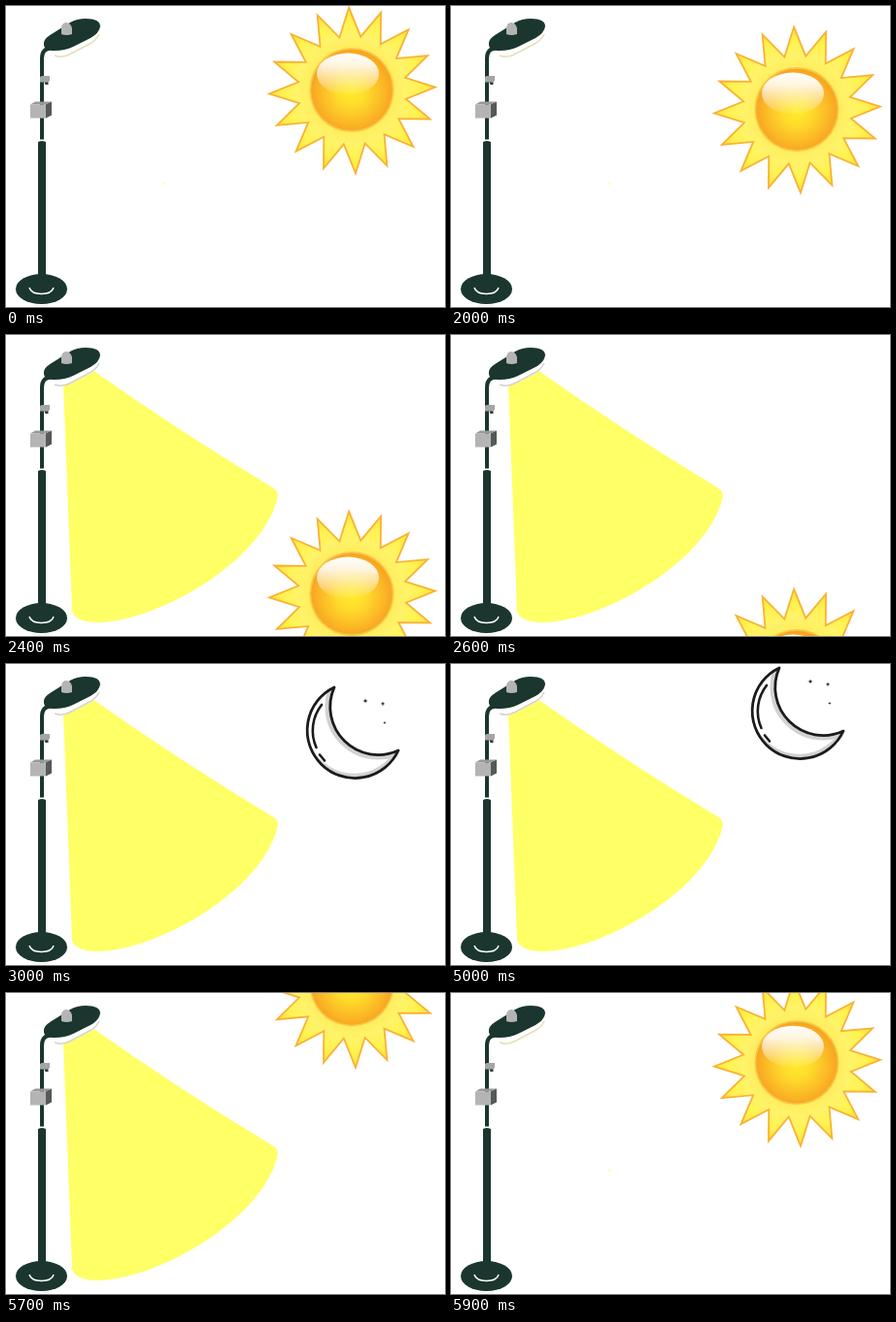
An HTML page for the animation above (6000 ms loop, 452 by 310 pixels).

```html
<!DOCTYPE html>
<html lang="en">
<head>
<meta charset="utf-8">
<title>Street lamp, day and night</title>
<style>
  html, body { margin: 0; width: 100%; height: 100%; overflow: hidden; background: #fff; }
  svg { display: block; width: 100%; height: 100%; }
</style>
</head>
<body>
<svg viewBox="0 0 452 310">
  <defs>
    <radialGradient id="rayFill" gradientUnits="userSpaceOnUse" cx="356" cy="86.500" r="86">
      <stop offset=".5" stop-color="#ffed5c"/>
      <stop offset=".64" stop-color="#fff36a"/>
      <stop offset=".8" stop-color="#fff352"/>
      <stop offset="1" stop-color="#ffe23a"/>
    </radialGradient>
    <radialGradient id="bodyFill" cx=".5" cy=".52" r=".52">
      <stop offset="0" stop-color="#ffec2c"/>
      <stop offset=".35" stop-color="#fedb2b"/>
      <stop offset=".75" stop-color="#fbb826"/>
      <stop offset="1" stop-color="#f7a21f"/>
    </radialGradient>
    <linearGradient id="gloss" x2="0" y2="1">
      <stop offset="0" stop-color="#fff"/>
      <stop offset=".3" stop-color="#fff" stop-opacity=".85"/>
      <stop offset="1" stop-color="#fff" stop-opacity=".04"/>
    </linearGradient>
    <path id="crescent" d="M338 24A49.200 49.200 0 1 0 404 89A49.500 49.500 0 0 1 338 24Z"/>
    <clipPath id="inMoon"><use href="#crescent"/></clipPath>
  </defs>

  <g id="beam">
    <path fill="#ffff66" d="M59 50L68 284Q71 296 95 296C160 294 264 232 279.500 168Q281 161 275 157.500Q175 97 89 36Z"/>
  </g>
  <circle id="spot" cx="163" cy="182.500" r="1.200" fill="#ffffb4"/>

  <g id="lamp">
    <path fill="#fff" d="M44 46L50 51Q58 54 66 50L88 39Q95 35 96 27Z"/>
    <path id="rim" fill="none" stroke-width="1.500" d="M50 51Q58 54 66 49.500L87 38.500Q93 35 96 29"/>
    <path fill="none" stroke="#1a362e" stroke-width="4" d="M46 43.500Q37 44 37 54V137.500"/>
    <path fill="#1a362e" d="M39 38Q39 34 46 29.500L66 17Q73 13 82 13Q97 13 97 21Q96 28 87 33L69 42Q61 46 50 46Q38 46 39 38Z"/>
    <path fill="#b4b4b4" d="M57 29V22Q58 17 62.500 17Q67 18 68 23V29Q62 31 57 29Z"/>
    <path fill="#333b39" d="M39 77H43.500V81H40.500Z"/>
    <path fill="#a5a5a5" d="M35 73L37 72H45V77L43 78.500H35Z"/>
    <path fill="#55595a" d="M41 101L47 98.500V112.500L41 115.500Z"/>
    <path fill="#999" d="M25 101.500L30 98.500H47L41 101.500Z"/>
    <path fill="#b4b4b4" d="M25 101.500H41V115.500H25Z"/>
    <path fill="#1a362e" d="M33 140Q37 138 41 140V280H33Z"/>
    <ellipse cx="36.500" cy="291.500" rx="26.500" ry="15.500" fill="#1a362e"/>
    <path fill="none" stroke="#fff" stroke-width="1.500" d="M24 290Q26 296.500 36.500 296.500T49 290"/>
    <path fill="none" stroke="#eee" d="M28 308.500Q36 309.500 44 308.500"/>
  </g>

  <g id="sun">
    <path id="rays" fill="url(#rayFill)" stroke="#f9b233" stroke-width="1.800"/>
    <circle cx="356" cy="86.500" r="43.500" fill="#f6bb42" opacity=".75"/>
    <circle cx="356" cy="86.500" r="41.800" fill="url(#bodyFill)"/>
    <ellipse cx="352" cy="70" rx="32" ry="21.500" fill="url(#gloss)"/>
  </g>

  <g id="moon">
    <g clip-path="url(#inMoon)">
      <rect x="300" y="15" width="115" height="110" fill="#d2d2d2"/>
      <circle cx="358.500" cy="63.500" r="49.200" fill="#fff"/>
      <circle cx="383" cy="44" r="49.500" fill="none" stroke="#d2d2d2" stroke-width="10"/>
    </g>
    <use href="#crescent" fill="none" stroke="#1b1b1b" stroke-width="2.800" stroke-linejoin="round"/>
    <g fill="none" stroke="#1b1b1b" stroke-width="2.600" stroke-linecap="round">
      <path d="M325 42A43 43 0 0 0 319.500 86"/>
      <path d="M323 93.500L328 99.500"/>
    </g>
    <path id="stars" fill="#1b1b1b"/>
  </g>
</svg>
<script>
const LOOP = 6000, STEP = 100;
const el = id => document.getElementById(id);
const [sun, moon, beam, spot, rim] = ['sun', 'moon', 'beam', 'spot', 'rim'].map(el);

function rayPath() {
  let d = '';
  for (let i = 0; i < 32; i++) {
    const a = (-92.3 + i * 11.25) * Math.PI / 180;
    const r = i % 2 ? 56 : 85.5;
    d += (i ? 'L' : 'M') + (356.5 + r * Math.cos(a)).toFixed(2) + ' ' + (87 + r * Math.sin(a)).toFixed(2);
  }
  return d + 'Z';
}

function starPath(x, y, r) {
  return `M${x} ${y - r}Q${x} ${y} ${x + r} ${y}Q${x} ${y} ${x} ${y + r}` +
    `Q${x} ${y} ${x - r} ${y}Q${x} ${y} ${x} ${y - r}Z` +
    `M${x - r / 2} ${y}L${x} ${y - r / 2}L${x + r / 2} ${y}L${x} ${y + r / 2}Z`;
}

el('rays').setAttribute('d', rayPath());
el('stars').setAttribute('d', starPath(370, 38, 3) + starPath(388, 41, 2.4) + starPath(390, 60.5, 1.8));

// Drop in from above, n steps after becoming visible
const enter = n => Math.min(0, -136 + 40.4 * n);

function place(node, y) {
  node.style.display = y === null ? 'none' : '';
  if (y !== null) node.setAttribute('transform', `translate(0 ${y})`);
}

function sunY(k) {
  if (k < 20) return 0;
  if (k < 28) return 20 + 40 * (k - 20);
  return k < 56 ? null : enter(k - 56);
}

function moonY(k) {
  if (k < 27 || k > 54) return null;
  return k < 50 ? enter(k - 26) : -20 * (k - 49);
}

function draw(t) {
  const k = Math.floor((t % LOOP) / STEP);
  const lit = k >= 23 && k < 58;
  place(sun, sunY(k));
  place(moon, moonY(k));
  beam.style.display = lit ? '' : 'none';
  spot.style.display = lit ? 'none' : '';
  rim.setAttribute('stroke', lit ? '#d4d4d0' : '#e4e0b4');
}

const start = performance.now();
function tick() {
  draw(performance.now() - start);
  requestAnimationFrame(tick);
}
tick();
</script>
</body>
</html>
```
